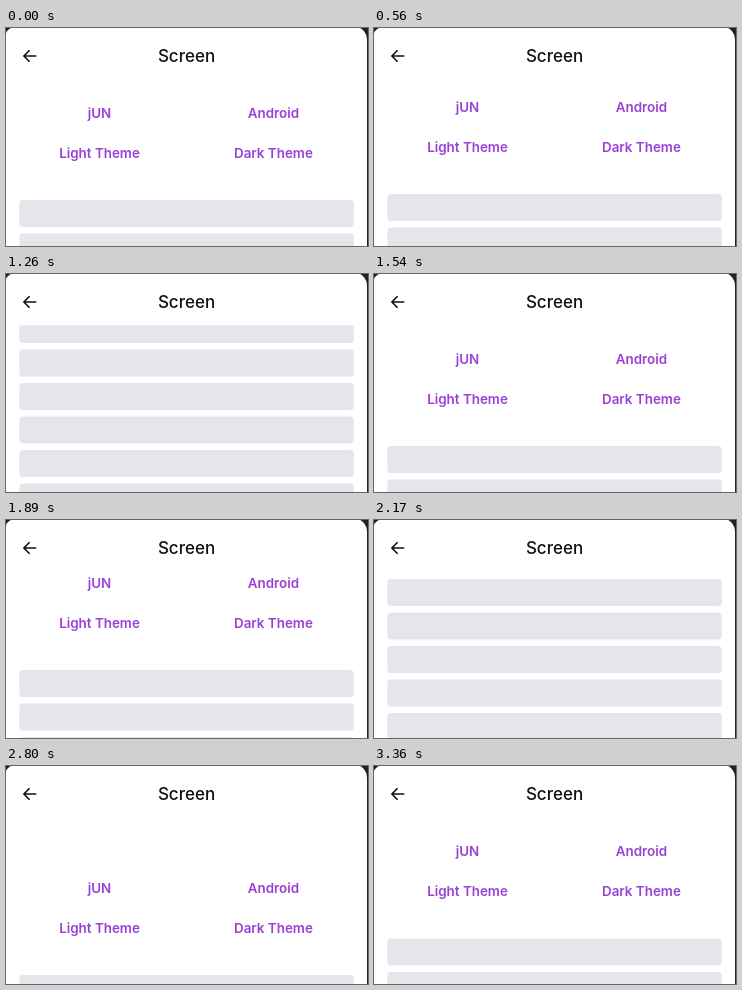
Animation, 362 px wide and 218 px high, one loop 3430 ms. Source, as an HTML page:

```html
<!DOCTYPE html>
<html lang="en">
<head>
<meta charset="utf-8">
<title>Scrolling screen</title>
<style>
  html, body { margin: 0; width: 100%; height: 100%; overflow: hidden; background: #fff; }
  svg { display: block; width: 362px; height: 218px; }
  text { font-family: Inter, "Liberation Sans", sans-serif; text-anchor: middle; }
  .title { font-size: 17px; font-weight: 500; fill: #111; }
  .button { font-size: 13.4px; font-weight: 600; fill: #9a40d8; }
</style>
</head>
<body>
<svg viewBox="0 0 362 218">
  <defs>
    <clipPath id="body"><rect y="51.3" width="361" height="167"/></clipPath>
  </defs>
  <rect width="362" height="218" fill="#222"/>
  <rect x="-2" y="-2" width="363" height="240" rx="14" fill="#fff"/>
  <path d="M30.3 28H18M23.6 22.3L17.9 28L23.6 33.7" fill="none" stroke="#111" stroke-width="1.6"/>
  <text class="title" x="180.5" y="34">Screen</text>
  <g clip-path="url(#body)">
    <g id="list">
      <text class="button" x="93.5" y="90">jUN</text>
      <text class="button" x="267.4" y="90">Android</text>
      <text class="button" x="93.5" y="130">Light Theme</text>
      <text class="button" x="267.4" y="130">Dark Theme</text>
    </g>
  </g>
</svg>
<script>
  const LOOP = 3430, STEP = 70;
  const BAR_TOP = 172, BAR_PITCH = 33.5, BAR_COUNT = 12;
  const list = document.getElementById('list');

  for (let i = 0; i < BAR_COUNT; i++) {
    const bar = document.createElementNS('http://www.w3.org/2000/svg', 'rect');
    const attrs = { x: 13.4, y: BAR_TOP + i * BAR_PITCH, width: 334.4, height: 27, rx: 3.5, fill: '#e5e5eb' };
    for (const name in attrs) bar.setAttribute(name, attrs[name]);
    list.append(bar);
  }

  // Scroll gestures: start time, then one offset per step; negative is overscroll.
  const gestures = [
    [490, 0, 6, 28, 55, 80, 101, 117, 128, 134, 136],
    [1190, 136, 130, 108, 74, 36, 0, -26, -35, -27],
    [1820, -3, 22, 52, 79, 99, 113, 121, 125, 126],
    [2380, 126, 120, 95, 60, 22, -12, -37, -39, -32]
  ];
  const BOUNCE = 2940;

  function offsetAt(time) {
    if (time >= BOUNCE) {
      const s = (time - BOUNCE) / 1000;
      return -32 * (1 + 4 * s) * Math.exp(-12.5 * s);
    }
    const gesture = gestures.filter(g => g[0] <= time).pop();
    if (!gesture) return 0;
    const index = 1 + Math.round((time - gesture[0]) / STEP);
    return gesture[Math.min(index, gesture.length - 1)];
  }

  function draw(time) {
    const held = Math.floor(time / STEP) * STEP;
    list.setAttribute('transform', `translate(0 ${-offsetAt(held)})`);
  }

  const start = performance.now();
  function tick() {
    draw((performance.now() - start) % LOOP);
    requestAnimationFrame(tick);
  }
  draw(0);
  requestAnimationFrame(tick);
</script>
</body>
</html>
```
